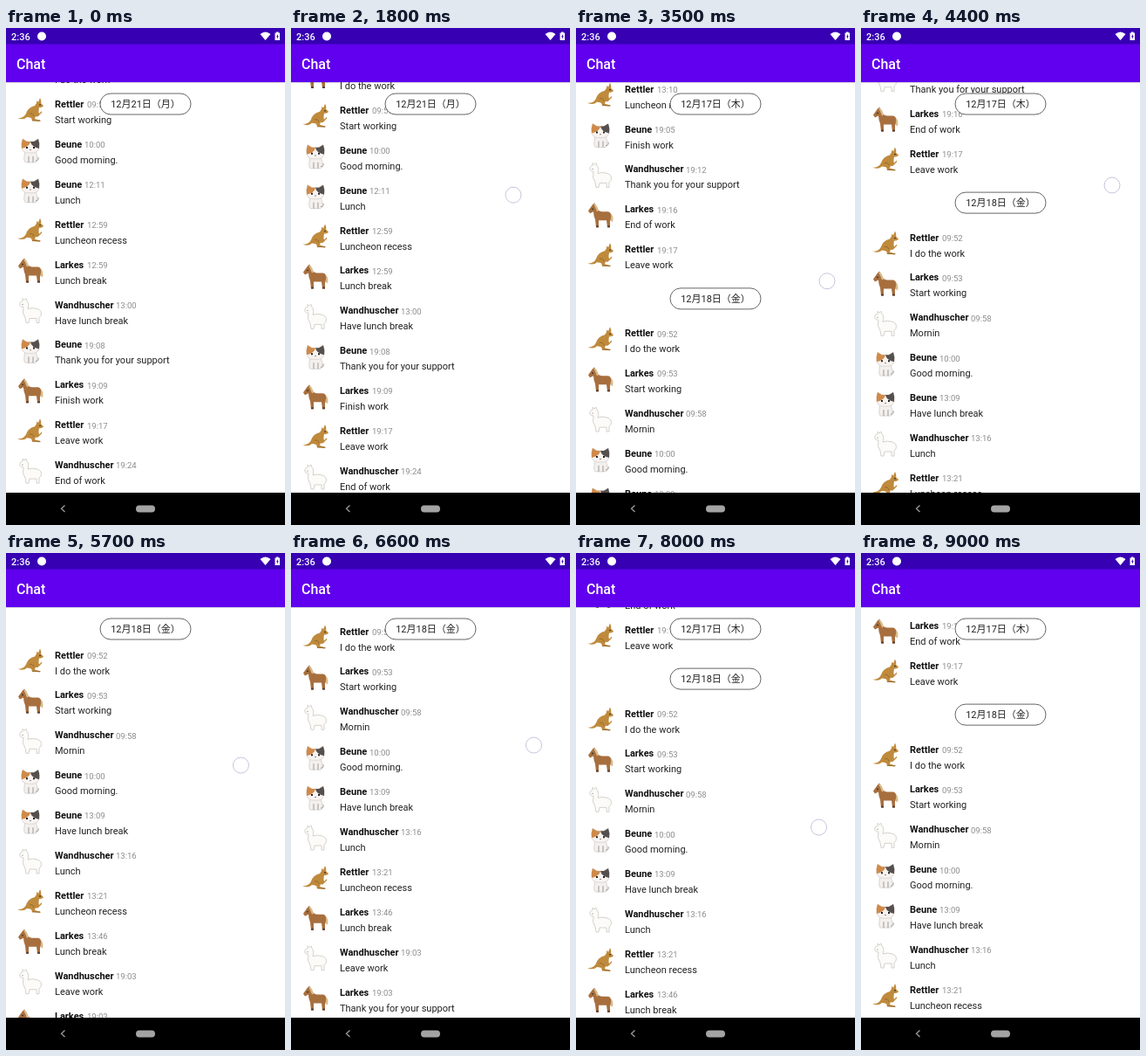
An HTML page that plays this animation: 320 by 569 pixels, repeating every 9.1 s.

```html
<!DOCTYPE html>
<html lang="en">
<head>
<meta charset="utf-8">
<title>Chat</title>
<style>
html, body { margin: 0; height: 100%; overflow: hidden; background: #fff }
svg { display: block; width: 100%; height: 100%; font: 11px Roboto, "Noto Sans CJK JP", "Noto Sans CJK", sans-serif; fill: #222 }
.name { font-weight: 700; fill: #111 }
.time { font-size: 9.5px; fill: #8c8c8c }
.pill rect { fill: #fff; stroke: #666 }
.pill text { text-anchor: middle }
</style>
</head>
<body>
<svg viewBox="0 0 320 569">
  <defs>
    <g id="kangaroo">
      <path fill="#bf8a3c" d="M-15 9Q-8 10-5 4Q-3-3 5-5L7-8Q7-13 9-9L11-14Q13-10 12-8L15-5Q14-3 10-3Q9 2 10 4L13 1L13 3L9 7Q7 8 6 7L5 10L12 12L11 13L2 12L1 9Q-2 8-4 8Q-8 12-15 9Z"/>
      <path fill="none" stroke="#8c6228" stroke-width=".8" d="M-1 4Q3 3 4 7M2 12H11"/>
      <circle cx="11" cy="-6" r=".8" fill="#222"/>
    </g>
    <g id="horse">
      <path fill="#d9bd8c" d="M10-3Q16 0 14 8L11 6Z"/>
      <path fill="#a86f3e" d="M-14-5L-9-12L-7-14L-5-11Q-3-4 2-4L9-4Q13-3 12 3L11 7V14H8L7 6L-2 6V14H-5L-6 5Q-8 0-8-4L-12-2Z"/>
      <path fill="#d9bd8c" d="M-8-13Q-4-13-2-5L-4-4L-6-9Z"/>
      <path fill="#5f4030" d="M-5 12H-2V14H-5ZM8 12H11V14H8Z"/>
      <circle cx="-9" cy="-7" r=".8" fill="#222"/>
    </g>
    <g id="alpaca" fill="#fcfbf8" stroke="#c9c7c2" stroke-width=".8">
      <path d="M-12-6Q-13-10-9-11L-9-14L-7-12L-5-14L-4-11Q-1-8-3-2Q2-4 8-2Q14 0 12 6L10 8V14H7V9H-1L-2 14H-5L-6 8Q-10 3-8-4Q-11-4-12-6Z"/>
      <circle cx="-9" cy="-7" r=".5" fill="#444" stroke="none"/>
    </g>
    <g id="cat">
      <path fill="#f3f0ee" stroke="#c4c0bc" stroke-width=".6" d="M-6 1Q-9 14-5 14H6Q10 12 6 1Z"/>
      <path fill="none" stroke="#8a8580" stroke-width=".8" d="M-2 7V14M3 7V14M6 12Q10 12 9 8"/>
      <path fill="#f8f3f0" stroke="#c4c0bc" stroke-width=".5" d="M-9-13L-4-10H4L9-13Q13 2 4 3H-4Q-13 2-9-13Z"/>
      <path fill="#cf8a4a" d="M-9-13L-4-10L0-10Q-1-4-10-2Q-11-8-9-13Z"/>
      <path fill="#55504e" d="M9-13L4-10L0-10Q1-4 10-2Q11-8 9-13Z"/>
      <path fill="#222" d="M-5-4H-3V-2H-5ZM3-4H5V-2H3ZM-1-1H1L0 0Z"/>
    </g>
  </defs>
  <rect width="320" height="569" fill="#fff"/>
  <g id="list"></g>
  <g id="pills"></g>
  <circle id="touch" r="9" fill="#fff" fill-opacity=".5" stroke="#c6c6de"/>
  <rect y="61" width="320" height="2" fill="#000" fill-opacity=".15"/>
  <rect width="320" height="62" fill="#6000ee"/>
  <rect width="320" height="18.500" fill="#3700b3"/>
  <g fill="#fff">
    <text x="6" y="13.500" font-weight="500">2:36</text>
    <circle cx="41" cy="9.500" r="5"/>
    <path d="M291.500 7Q297.500 2 303.500 7L297.500 14ZM308.500 5.500H310V4.500H312.500V5.500H314V14H308.500Z"/>
    <path fill="#3700b3" d="M311.800 7L310 10.200H311V12.500L312.700 9.300H311.800Z"/>
    <text x="12" y="46.500" font-size="16" font-weight="500">Chat</text>
  </g>
  <rect y="532" width="320" height="37" fill="#000"/>
  <path d="M67.500 546.500L63.500 550.300L67.500 554" fill="none" stroke="#999" stroke-width="1.300"/>
  <rect x="149" y="546.500" width="22" height="8" rx="4" fill="#a3a3a3"/>
</svg>
<script>
const $ = id => document.getElementById(id);
const LOOP = 9100, STEP = 100, ROW = 45.9, STICK = 87, PUSH = 50;

// name, avatar, x of the time
const people = {
  R: ['Rettler', 'kangaroo', 93],
  L: ['Larkes', 'horse', 93],
  W: ['Wandhuscher', 'alpaca', 126],
  B: ['Beune', 'cat', 90]
};

const days = [
  ['12月17日（木）', [
    'W 12:58 Have lunch break', 'L 13:02 Lunch break', 'R 13:10 Luncheon recess', 'B 19:05 Finish work',
    'W 19:12 Thank you for your support', 'L 19:16 End of work', 'R 19:17 Leave work']],
  ['12月18日（金）', [
    'R 09:52 I do the work', 'L 09:53 Start working', 'W 09:58 Mornin', 'B 10:00 Good morning.',
    'B 13:09 Have lunch break', 'W 13:16 Lunch', 'R 13:21 Luncheon recess', 'L 13:46 Lunch break',
    'W 19:03 Leave work', 'L 19:03 Thank you for your support', 'R 19:22 End of work', 'B 19:28 Finish work']],
  ['12月21日（月）', [
    'W 09:50 Mornin', 'L 09:52 I do the work', 'R 09:55 Start working', 'B 10:00 Good morning.',
    'B 12:11 Lunch', 'R 12:59 Luncheon recess', 'L 12:59 Lunch break', 'W 13:00 Have lunch break',
    'B 19:08 Thank you for your support', 'L 19:09 Finish work', 'R 19:17 Leave work', 'W 19:24 End of work']]
];

// Lay out so that the first row of the middle day sits at y = 0
const heads = [];
let y = -days[0][1].length * ROW - 100.2, rows = '', pills = '';
for (const [date, lines] of days) {
  heads.push(y + 10.7);
  y += 50.1;
  pills += `<g class="pill"><rect x="108" y="-12" width="104" height="24" rx="12"/><text x="160" y="4">${date}</text></g>`;
  for (const line of lines) {
    const [, key, time, text] = line.match(/(\S+) (\S+) (.+)/);
    const [name, avatar, timeX] = people[key];
    rows += `<g transform="translate(0 ${y})"><use href="#${avatar}" x="28" y="7"/>
      <text class="name" x="56" y="4">${name}</text><text class="time" x="${timeX}" y="4.3">${time}</text>
      <text x="56" y="22">${text}</text></g>`;
    y += ROW;
  }
}
$('list').innerHTML = rows;
$('pills').innerHTML = pills;

// time, scroll offset: two flings back, a slow drag forward, a slow drag back
const scroll = [
  [0, -605.7], [1750, -605.7], [2000, -490], [2300, -170], [2600, -2.3], [2800, 70], [3100, 260],
  [3450, 350], [4000, 298], [4400, 239.5], [4800, 196], [5000, 188], [5700, 116.5],
  [6250, 80], [6600, 89.5], [8000, 183.5], [8700, 224.5], [LOOP, 224.5]
];

// start, end, x from/to, distance to the list from/to
const drags = [
  [1800, 2000, 255, 257, 790, 790],
  [2500, 2800, 259, 259, 356.3, 356.3],
  [3500, 4700, 288, 288, -59.5, -59.5],
  [5000, 8700, 261.5, 278.5, 123, 130.5]
];

// Monotone cubic interpolation
function scrollAt(t) {
  const slope = i => (scroll[i + 1][1] - scroll[i][1]) / (scroll[i + 1][0] - scroll[i][0]);
  const tangent = i => {
    if (!i || i === scroll.length - 1) return 0;
    const a = slope(i - 1), b = slope(i);
    return a * b <= 0 ? 0 : 2 * a * b / (a + b);
  };
  const i = scroll.findIndex(k => k[0] > t) - 1;
  const [t0, p0] = scroll[i], [t1, p1] = scroll[i + 1];
  const d = t1 - t0, u = (t - t0) / d, v = 1 - u;
  return v * v * (1 + 2 * u) * p0 + u * u * (3 - 2 * u) * p1
    + d * u * v * (v * tangent(i) - u * tangent(i + 1));
}

function draw(now) {
  const t = Math.floor(now % LOOP / STEP) * STEP;
  const pos = scrollAt(t);
  const move = (el, x, y) => el.setAttribute('transform', `translate(${x} ${y})`);
  move($('list'), 0, pos);
  heads.forEach((h, i) => {
    const next = i + 1 < heads.length ? heads[i + 1] + pos - PUSH : Infinity;
    move($('pills').children[i], 0, Math.min(Math.max(h + pos, STICK), next));
  });
  const drag = drags.find(d => t >= d[0] && t <= d[1]);
  $('touch').style.display = drag ? '' : 'none';
  if (drag) {
    const [start, , x0, x1, gap0, gap1] = drag;
    const k = Math.min(1, (t - start) / 1500);
    move($('touch'), x0 + (x1 - x0) * k, pos + gap0 + (gap1 - gap0) * k);
  }
  requestAnimationFrame(() => draw(performance.now()));
}
draw(performance.now());
</script>
</body>
</html>
```
